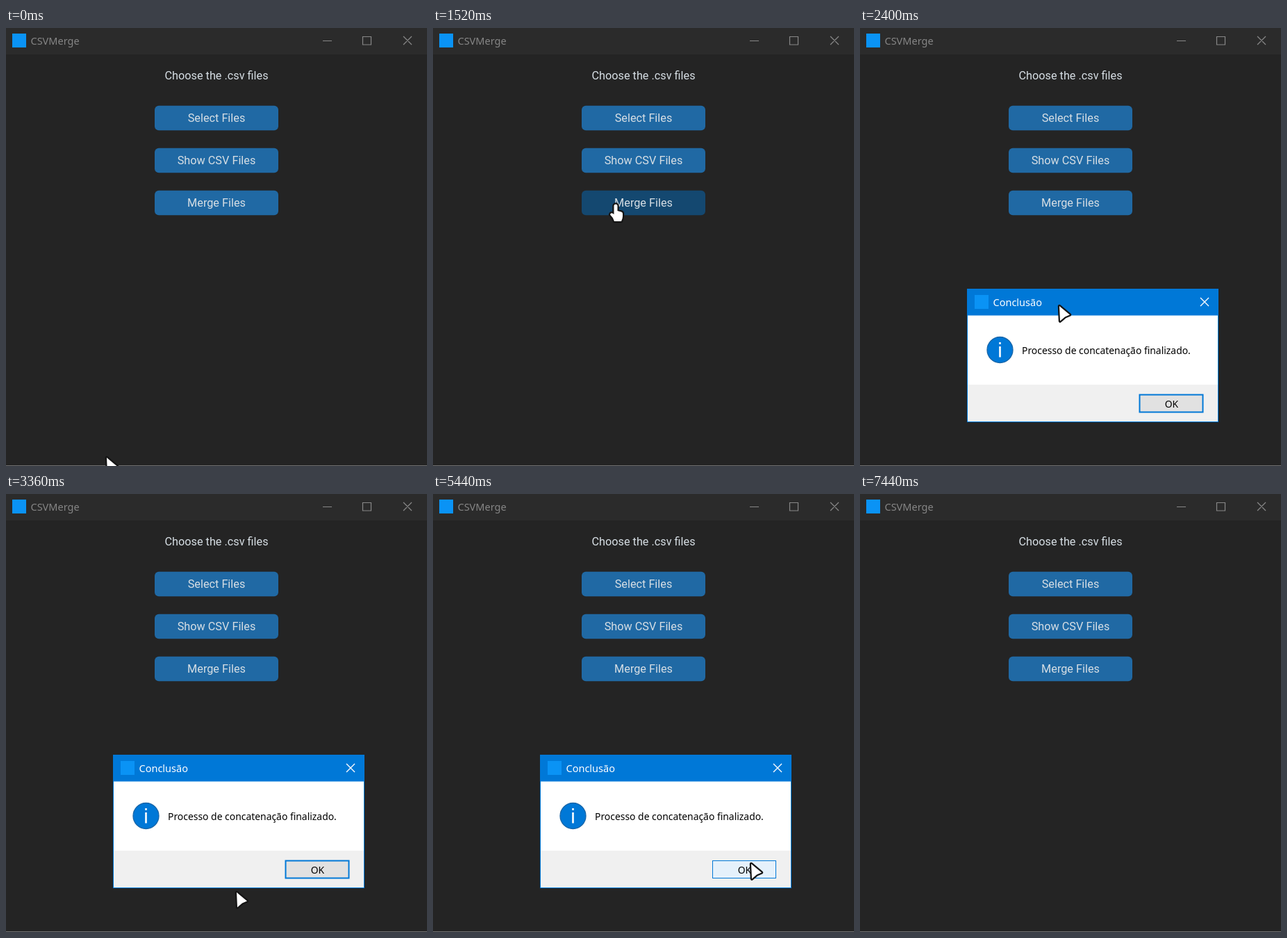
Write an HTML page that moves like this. It is 606 by 630 pixels and loops after 7.52 s.

```html
<!DOCTYPE html>
<html lang="en">
<head>
<meta charset="utf-8">
<title>CSVMerge</title>
<style>
html, body { margin: 0; width: 100%; height: 100%; overflow: hidden; background: #242424; }
svg { display: block; width: 606px; height: 630px; }
text { font: 14.5px "Noto Sans", "Open Sans", sans-serif; }
.app { font: 16.25px Roboto, sans-serif; fill: #d6dee4; text-anchor: middle; }
.button rect { fill: #2069a4; }
.button.hover rect { fill: #144870; }
#bar { fill: #2b2b2b; }
#controls { stroke: #888; fill: none; stroke-width: 1.2; }
#name { fill: #858585; }
.active #bar { fill: #0078d7; }
.active #controls { stroke: #fff; }
.active #name { fill: #fff; }
#ok rect { fill: #e1e1e1; stroke: #0078d7; stroke-width: 2; }
#ok.hover rect { fill: #e5f1fb; stroke-width: 1; }
#cursor { fill: #fff; stroke: #151515; stroke-width: 4.5; stroke-linejoin: round; paint-order: stroke; }
.message { font-size: 13.9px; }
</style>
</head>
<body>
<svg viewBox="0 0 606 630">
  <rect width="606" height="630" fill="#242424"/>
  <g id="header">
    <rect id="bar" width="606" height="38"/>
    <rect x="9" y="8" width="20" height="20" fill="#0a93f5"/>
    <text id="name" x="35.5" y="24">CSVMerge</text>
    <path id="controls" d="M456 18.5H469M513.5 12.5H525.5V24H513.5ZM572 12L584 24M584 12L572 24"/>
  </g>
  <text class="app" x="303" y="73.7">Choose the .csv files</text>
  <g id="buttons"></g>
  <path d="M0 629.5H606" stroke="#707070"/>
  <g id="dialog">
    <rect x="154" y="375" width="362" height="192" fill="#0078d7"/>
    <rect x="155" y="413.5" width="360" height="100" fill="#fff"/>
    <rect x="155" y="513" width="360" height="53" fill="#f0f0f0"/>
    <rect x="165" y="384" width="20" height="20" fill="#0a93f5"/>
    <text x="191.5" y="400" fill="#fff">Conclusão</text>
    <path d="M490 388L502 400M502 388L490 400" stroke="#fff" stroke-width="1.4"/>
    <circle cx="201.5" cy="463" r="18.5" fill="#0078d7" stroke="#1464a8" stroke-width="1.3"/>
    <path d="M201.5 458V473.5M201.5 452V454.8" stroke="#fff" stroke-width="2.6"/>
    <text class="message" x="233" y="469">Processo de concatenação finalizado.</text>
    <g id="ok">
      <rect x="402.5" y="527.5" width="91" height="25"/>
      <text class="message" x="448.5" y="546" text-anchor="middle">OK</text>
    </g>
  </g>
  <path id="cursor"/>
</svg>
<script>
const LOOP = 7520, STEP = 80, TRAVEL = 800;
const ARROW = "M0 0L15 12.5L8 15.5L1 21.5Z";
const HAND = "M-2.5 2A2.5 2.5 0 0 1 2.5 2V9L8 10.5Q10 11 10 13V17Q10 20 8 24H-2Q-4 18-8 14.5Q-7 11-4 13L-2.5 14Z";

// Where the pointer rests; it sets off TRAVEL ms before it arrives.
const stops = [
  { at: 0, x: 145, y: 618 },
  { at: 960, x: 263, y: 254 },
  { at: 2400, x: 287, y: 400 },
  { at: 3360, x: 332, y: 573 },
  { at: 4640, x: 390, y: 597 },
  { at: 5440, x: 458, y: 532 },
  { at: 6960, x: 165, y: 640 }
];

const get = id => document.getElementById(id);
const easeOut = k => 1 - (1 - k) ** 2;

const buttons = ["Select Files", "Show CSV Files", "Merge Files"].map((label, i) => {
  const top = 111.7 + i * 61;
  get("buttons").insertAdjacentHTML("beforeend",
    `<g class="button"><rect x="214" y="${top}" width="178" height="35.6" rx="6"/>
     <text class="app" x="303" y="${top + 22.9}">${label}</text></g>`);
  return get("buttons").lastElementChild;
});

function pointerAt(t) {
  const i = stops.findLastIndex(s => s.at - TRAVEL <= t);
  const to = stops[i], from = stops[i - 1] || to;
  const k = easeOut(Math.min(1, (t - to.at + TRAVEL) / TRAVEL));
  return { x: from.x + (to.x - from.x) * k, y: from.y + (to.y - from.y) * k };
}

function setHover(node, { x, y }, enabled) {
  const box = node.querySelector("rect").getBBox();
  const hover = enabled && x >= box.x && x <= box.x + box.width && y >= box.y && y <= box.y + box.height;
  node.classList.toggle("hover", hover);
  return hover;
}

function draw() {
  const t = Math.floor(performance.now() % LOOP / STEP) * STEP;
  const pointer = pointerAt(t);
  const open = t >= 1840 && t < 5760;
  const active = t >= 1680 && t < 7280 && !open;

  get("header").classList.toggle("active", active);
  get("dialog").style.display = open ? "" : "none";
  if (open) setHover(get("ok"), pointer, true);
  const hand = buttons.filter(b => setHover(b, pointer, !open)).length > 0;
  get("cursor").setAttribute("d", hand ? HAND : ARROW);
  get("cursor").setAttribute("transform", `translate(${pointer.x} ${pointer.y})`);
  requestAnimationFrame(draw);
}
draw();
</script>
</body>
</html>
```
